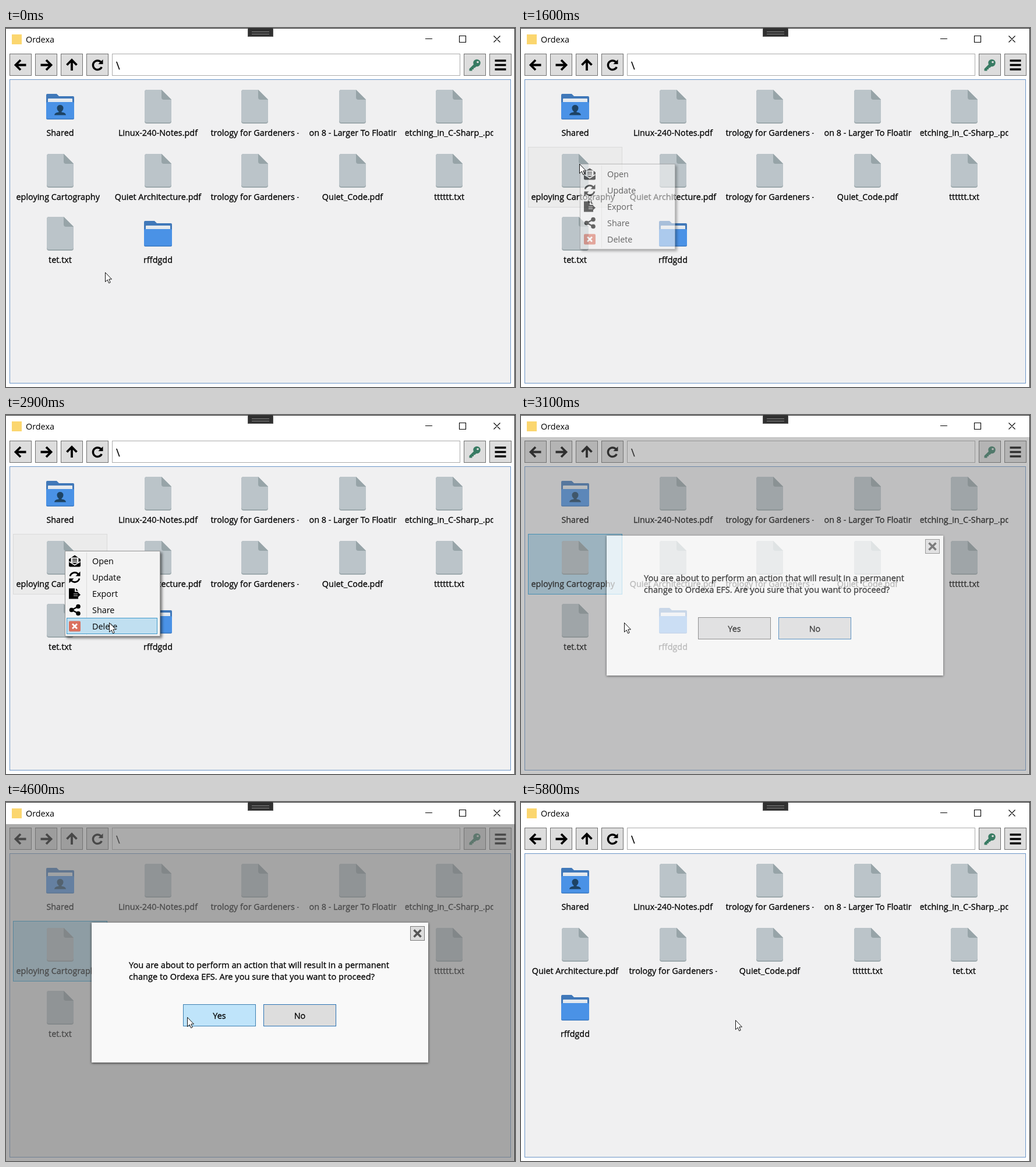
Recreate the animation shown at these times as an HTML page. Size 874 px wide and 616 px high, loop 5900 ms.

```html
<!DOCTYPE html>
<html lang="en">
<head>
<meta charset="utf-8">
<title>File manager</title>
<style>
  html, body { margin: 0; width: 100%; height: 100%; overflow: hidden; background: #fff; }
  svg { display: block; }
  text { font: 14.4px "Open Sans", "Noto Sans", sans-serif; white-space: pre; }
  #message text { font-size: 14.6px; }
  .mid text, text.mid { stroke: #000; stroke-width: .3px; }
  .line { fill: none; stroke: #000; }
</style>
</head>
<body>
<svg id="stage" width="874" height="616" viewBox="0 0 874 616"></svg>
<script>
const LOOP = 5900, STEP = 100;
const COLS = [93, 261, 427, 595, 761], ROWS = [94, 204, 312];
const CELL = { w: 161, h: 103 };
const DOOMED = 5;

// name, kind, and for clipped names the start of the visible part
const FILES = [
  ["Shared", "shared"],
  ["Linux-240-Notes.pdf"],
  ["trology for Gardeners -", "file", 0],
  ["on 8 - Larger To Floatin", "file", 1],
  ["etching_in_C-Sharp_.pdf", "file", -1],
  ["eploying Cartography", "file", 0],
  ["Quiet Architecture.pdf"],
  ["trology for Gardeners -", "file", 0],
  ["Quiet_Code.pdf"],
  ["tttttt.txt"],
  ["tet.txt"],
  ["rffdgdd", "folder"]
];

const MENU = ["Open", "Update", "Export", "Share", "Delete"];

// time, x, y
const CURSOR = [
  [100, 170, 419], [1000, 100, 233], [1900, 100, 233],
  [2500, 177, 356], [3900, 177, 356], [5000, 368, 374]
];
// time, opacity
const MENU_FADE = [[1400, 0], [1600, .58], [1700, .85], [1800, 1], [2900, 1], [3000, 0]];
const DIM_FADE = [[2900, 0], [3000, .15], [3100, .4], [3300, .61], [5500, .61], [5600, .45], [5700, .2], [5800, 0]];
const DIALOG_FADE = [[2900, 0], [3000, .3], [3100, .74], [3200, .92], [3300, 1], [5500, 1], [5600, .5], [5700, 0]];

const rect = (x, y, w, h, fill, stroke = "none", more = "") =>
  `<rect x="${x}" y="${y}" width="${w}" height="${h}" fill="${fill}" stroke="${stroke}" ${more}/>`;
const path = (d, more = "") => `<path d="${d}" ${more}/>`;
const line = (d, width, more = "") => path(d, `class="line" stroke-width="${width}" ${more}`);
const text = (x, y, s, more = "") => `<text x="${x}" y="${y}" ${more}>${s}</text>`;
const group = (s, more = "") => `<g ${more}>${s}</g>`;
const at = (x, y, s) => group(s, `transform="translate(${x} ${y})"`);

// Icons of the files, with the origin at the top middle of a cell
const sheet =
  path("M-19 12H6L23 29V66a4 4 0 0 1-4 4H-19a4 4 0 0 1-4-4V16a4 4 0 0 1 4-4z", 'fill="#9ca8ac"') +
  path("M-19 12H6L23 29V64a4 4 0 0 1-4 4H-19a4 4 0 0 1-4-4V16a4 4 0 0 1 4-4z", 'fill="#bbc4c9"') +
  path("M6 12L23 29H10a4 4 0 0 1-4-4z", 'fill="#97a4a8"');
const folder =
  path("M-22 19H-6l4 4H22a2 2 0 0 1 2 2V58H-24V21a2 2 0 0 1 2-2z", 'fill="#4078b9"') +
  rect(-21, 27, 42, 12, "#e4e9ee", "none", 'rx="1"') +
  rect(-24, 33, 48, 30, "#3f7cc4", "none", 'rx="2.5"') +
  rect(-24, 33, 48, 28.5, "#4a92e6", "none", 'rx="2.5"');
const person =
  path("M-5.500 43a5.500 5 0 0 1 11 0q0 4-3 6v1.500q7 .500 7.500 5H-10q.500-4.500 7.500-5V49q-3-2-3-6z", 'fill="#1d4364"');
const ICONS = { file: sheet, folder, shared: folder + person };

function fileItem([name, kind = "file", start]) {
  const label = start === undefined
    ? text(75.5, 20, name, 'text-anchor="middle"')
    : text(start, 20, name);
  return group(ICONS[kind] +
    `<svg x="-75.5" y="71" width="151" height="28" overflow="hidden">${label}</svg>`, 'class="item mid"');
}

const button = (x, icon) => rect(x + .5, 44.5, 37, 37, "#ddd", "#707070") + at(x + 19, 63.5, icon);
const arrow = turn => line("M9.500 0H-8M0-8.500L-8.500 0 0 8.500", 3.8, `transform="rotate(${turn})"`);
const reload =
  line("M7.300 3.500A7.800 7.800 0 1 1 6-5", 3.4) + path("M9.500-9.500V-1.500H1.500z");
const key = group(
  `<circle cx="3.500" cy="-3.500" r="6.200"/>` +
  path("M-1-2L-9.500 6.500V10H-4.500V7.500H-2V5H0L4 1z") +
  `<circle cx="5" cy="-5" r="1.800" fill="#ddd"/>`, 'fill="#387b63"');
const bars = line("M-9.500-7.500H9.500M-9.500 0H9.500M-9.500 7.500H9.500", 3.6);

const chrome =
  rect(0, 0, 874, 616, "#fff") +
  rect(0, 0, 874, 1, "#2c2c2c") + rect(873, 0, 1, 616, "#2c2c2c") +
  rect(415.5, -.5, 43, 15, "#303030", "#555") +
  line("M422 6.500H452M422 10.500H452", 1, 'style="stroke:#858585"') +
  rect(10, 11, 17, 17, "#fbd66f") +
  text(34, 25, "Ordexa") +
  line("M720 18.500H732M778.500 13.500h11v11h-11zM837.500 13.500l11 11M848.500 13.500l-11 11", 1.1) +
  button(6, arrow(0)) + button(50, arrow(180)) + button(94, arrow(90)) + button(138, reload) +
  rect(182.5, 44.5, 597, 37, "#fff", "#ababab") +
  text(189, 71, "\\", 'class="mid" style="font-size:18px"') +
  button(786, key) + button(830, bars) +
  rect(6.5, 88.5, 860, 521, "#f0f0f1", "#6b95c8");

const menuIcons = [
  path("M-10-3L0-10 10-3V8a2 2 0 0 1-2 2H-8a2 2 0 0 1-2-2z") +
    rect(-6.5, -6, 13, 9, "#f3f3f3") + line("M-4-3H4M-4 0H4", 1.6) +
    line("M-9.500 1L0 7 9.500 1", 1.6, 'style="stroke:#f3f3f3"'),
  line("M-8-2A8.200 8.200 0 0 1 6-5.500M8 2A8.200 8.200 0 0 1-6 5.500", 2.8) +
    path("M9.500-10V-2H1.500zM-9.500 10V2H-1.500z"),
  path("M-10-9H0V-3H6V0H-2V4H6V9H-10z") + path("M2-9L6-5H2z") +
    line("M-2 2H6", 2.2) + path("M5-2.500L10 2 5 6.500z"),
  line("M6-6L-5 0 6 6", 2.4) +
    [[6, -6], [-5.5, 0], [6, 6]].map(([x, y]) => `<circle cx="${x}" cy="${y}" r="3.800"/>`).join(""),
  rect(-10, -9, 20, 18, "#da715f", "none", 'rx="2"') +
    line("M-4-4L4 4M4-4L-4 4", 2.8, 'style="stroke:#fff"')
];

const menu =
  rect(101.5, 233.5, 163, 146, "#f3f3f3", "#999", 'style="filter:drop-shadow(3px 3px 2px rgba(0,0,0,.5))"') +
  rect(138, 236, 1, 141, "#dcdcdc") +
  rect(104.5, 348.5, 155, 27, "#c0dff0", "#3f9acb", 'id="row"') +
  MENU.map((name, i) => at(118, 250.5 + 28 * i, menuIcons[i]) + text(148, 256 + 28 * i, name)).join("");

const choice = (id, x, name) =>
  rect(x + .5, 347.5, 124, 37, "#ddd", "#707070", `id="${id}"`) +
  text(x + 62.5, 372, name, 'text-anchor="middle"');
const dialog =
  rect(147, 207, 578, 240, "#f9f9f9", "none", 'style="filter:drop-shadow(.5px 1px 2px rgba(0,0,0,.7))"') +
  rect(694.5, 213.5, 24, 24, "#ddd", "#7a7a7a") +
  line("M700.500 219.500l12 12M712.500 219.500l-12 12", 3.6, 'style="stroke:#555"') +
  group(
    text(211, 285, "You are about to perform an action that will result in a permanent") +
    text(211, 305, "change to Ordexa EFS. Are you sure that you want to proceed?"),
    'id="message"') +
  choice("yes", 304, "Yes") + choice("no", 442, "No");

const stage = document.getElementById("stage");
stage.innerHTML = chrome +
  rect(0, 0, CELL.w, CELL.h, "none", "none", 'id="cell"') +
  FILES.map(fileItem).join("") +
  group(menu, 'id="menu"') +
  path("M0 38H873V616H0zM147 207h578v240h-578z", 'id="dim" fill="#767676" fill-rule="evenodd"') +
  group(dialog, 'id="dialog" class="mid"') +
  path("M.5.5V16.500L4.200 13 6.600 18.700 9.200 17.600 6.800 12H11.500z", 'id="cursor" fill="#fff" stroke="#111"');

const $ = id => document.getElementById(id);
const items = [...document.querySelectorAll(".item")];

const smooth = p => p * p * (3 - 2 * p);

// Values of a step table at a time
function sample(table, t, ease = p => p) {
  const next = table.findIndex(row => row[0] > t);
  if (next === 0) return table[0].slice(1);
  if (next < 0) return table[table.length - 1].slice(1);
  const a = table[next - 1], b = table[next];
  const p = ease((t - a[0]) / (b[0] - a[0]));
  return a.slice(1).map((v, i) => v + (b[i + 1] - v) * p);
}

function fade(id, table, t) {
  const [alpha] = sample(table, t);
  $(id).style.opacity = alpha;
  $(id).style.display = alpha ? "" : "none";
}

function paint(id, fill, stroke) {
  $(id).setAttribute("fill", fill);
  $(id).setAttribute("stroke", stroke);
}

const move = (el, x, y) => el.setAttribute("transform", `translate(${x} ${y})`);
const cellLeft = i => COLS[i % 5] - 80.5;
const cellTop = i => ROWS[Math.floor(i / 5)] + .5;
const inside = (v, start, size) => v >= start && v < start + size;

function drawItems(t) {
  const gone = t >= 5700;
  items.forEach((el, i) => {
    const slot = gone && i > DOOMED ? i - 1 : i;
    el.style.display = gone && i === DOOMED ? "none" : "";
    move(el, COLS[slot % 5], ROWS[Math.floor(slot / 5)]);
  });
}

function drawCell(t, x, y) {
  let slot = DOOMED;
  if (t < 1500) {
    slot = FILES.findIndex((_, i) => inside(x, cellLeft(i), CELL.w) && inside(y, cellTop(i), CELL.h));
    paint("cell", "#e5f3fb", "#70c0e7");
  } else if (t < 3000) paint("cell", "#ebebeb", "#dadada");
  else if (t < 4900) paint("cell", "#b6dcef", "#26a0da");
  else slot = -1;
  $("cell").style.display = slot < 0 ? "none" : "";
  if (slot >= 0) move($("cell"), cellLeft(slot), cellTop(slot));
}

function drawChoices(t, x, y) {
  const pressed = t >= 5400;
  const overYes = inside(x, 304, 125) && inside(y, 347, 38);
  if (overYes) paint("yes", "#bfe4fa", pressed ? "#2c628b" : "#3c7fb1");
  else paint("yes", "#ddd", "#707070");
  paint("no", "#ddd", pressed ? "#707070" : "#2a73b4");
}

function draw(t) {
  const [x, y] = sample(CURSOR, t, smooth).map(Math.round);
  move($("cursor"), x, y);
  drawItems(t);
  drawCell(t, x, y);
  drawChoices(t, x, y);

  fade("menu", MENU_FADE, t);
  fade("dim", DIM_FADE, t);
  fade("dialog", DIALOG_FADE, t);

  const row = Math.floor((y - 236) / 28);
  $("row").style.display = t > 1900 && row >= 0 ? "" : "none";
  $("row").setAttribute("y", 236.5 + 28 * row);
}

function tick() {
  const t = performance.now() % LOOP;
  draw(Math.floor(t / STEP) * STEP);
  requestAnimationFrame(tick);
}
tick();
</script>
</body>
</html>
```
